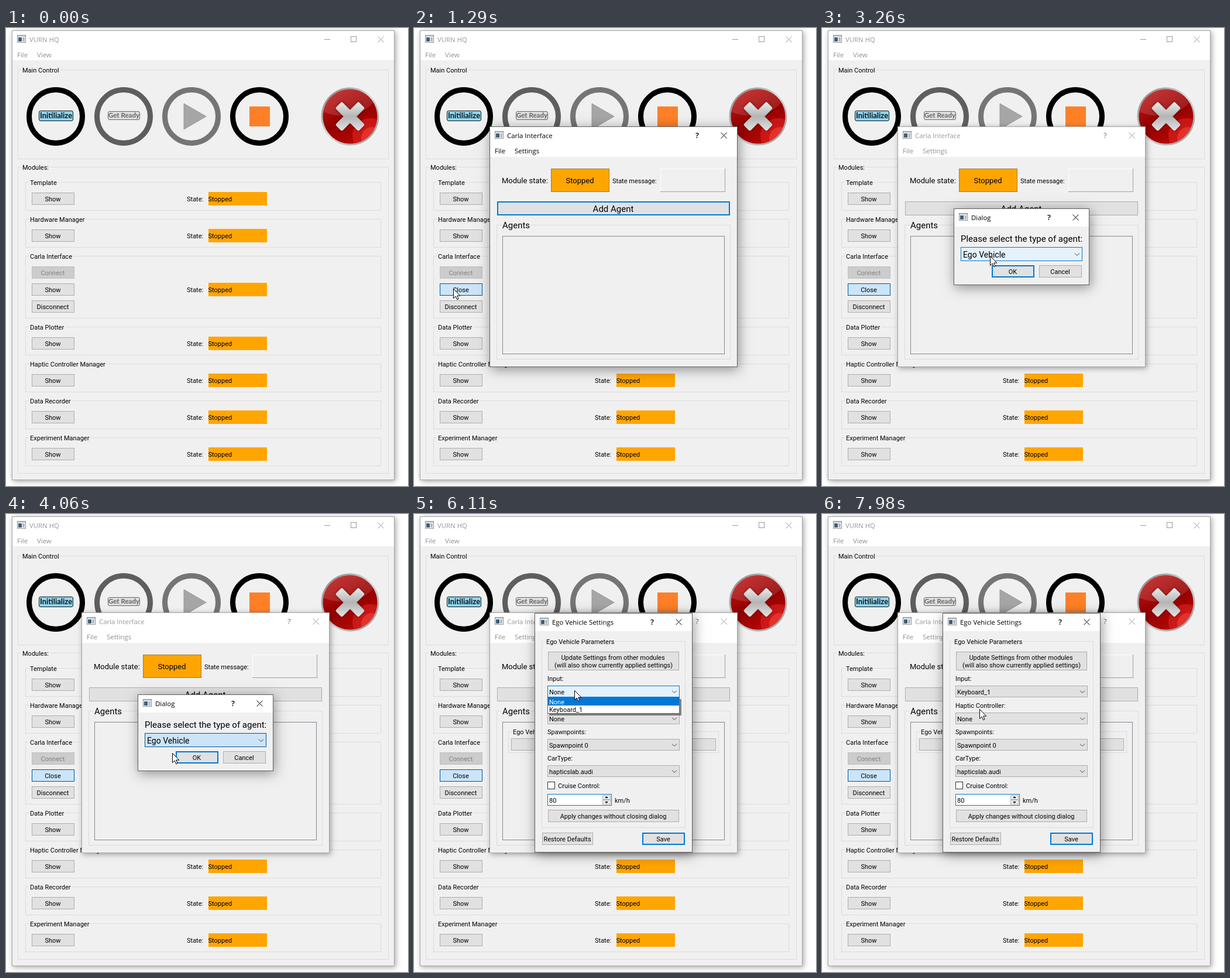
These frames come from a looping animation (687x782 px, 8000 ms). An HTML page with a canvas:

```html
<!DOCTYPE html>
<html lang="en">
<head>
<meta charset="utf-8">
<title>Module manager</title>
<style>
html, body { margin: 0; width: 100%; height: 100%; overflow: hidden; background: #fff; }
canvas { display: block; }
</style>
</head>
<body>
<canvas id="stage" width="687" height="782"></canvas>
<script>
const c = document.getElementById('stage').getContext('2d');
const LOOP = 8000, STEP = 75;
const UI = 'Roboto, sans-serif', TITLE = '"Open Sans", sans-serif', BOLD = 'Lato, sans-serif';
const BLUE = '#0078d7', FACE = '#f0f0f0', ORANGE = '#ffa500';

// Cursor path: time, x, y
const path = [
  [140, 602, 766], [290, 237, 542], [365, 237, 542], [815, 67, 445], [1455, 67, 445],
  [2060, 300, 308], [2690, 300, 308], [3120, 287, 389], [3560, 287, 389], [3760, 284, 408],
  [4070, 284, 408], [4330, 312, 415], [4560, 312, 415], [4840, 326, 408], [5100, 326, 408],
  [5720, 274, 300], [6190, 274, 301], [6560, 271, 335], [6730, 271, 334], [7820, 271, 334],
  [7960, 269, 333]
];
const clicks = [[860, 960], [2240, 2390], [3400, 3490], [3840, 3930], [4420, 4520], [5890, 6040], [6880, 7110]];

const clamp = v => Math.max(0, Math.min(1, v));
const progress = (t, from, to) => clamp((t - from) / (to - from));
const smooth = p => p * p * (3 - 2 * p);
const inside = (p, x, y, w, h) => p.x >= x && p.x < x + w && p.y >= y && p.y < y + h;

function cursorAt(t) {
  const time = 140 + Math.floor((t - 140) / STEP) * STEP;
  if (time < 140) return { x: -100, y: -100 };
  const i = path.findIndex(k => k[0] > time);
  if (i < 0) { const [, x, y] = path[path.length - 1]; return { x, y }; }
  const [t0, x0, y0] = path[i - 1], [t1, x1, y1] = path[i];
  const p = smooth(progress(time, t0, t1));
  return { x: Math.round(x0 + (x1 - x0) * p), y: Math.round(y0 + (y1 - y0) * p) };
}

function box(x, y, w, h, fill, border, line = 1) {
  if (border) {
    c.fillStyle = border;
    c.fillRect(x, y, w, h);
    x += line; y += line; w -= 2 * line; h -= 2 * line;
  }
  c.fillStyle = fill;
  c.fillRect(x, y, w, h);
}

function text(s, x, y, { size = 11, color = '#000', align = 'left', font = UI, weight = '' } = {}) {
  c.font = `${weight} ${size}px ${font}`;
  c.fillStyle = color;
  c.textAlign = align;
  c.fillText(s, x, y);
}

function polyline(points, color, width = 1) {
  c.beginPath();
  points.forEach(([x, y]) => c.lineTo(x, y));
  c.strokeStyle = color;
  c.lineWidth = width;
  c.stroke();
}

const looks = {
  normal: ['#e1e1e1', '#adadad'], hover: ['#e5f1fb', BLUE], pressed: ['#cce4f7', '#005499'],
  focus: ['#e1e1e1', BLUE, 2], focusHover: ['#e5f1fb', BLUE, 2], disabled: ['#cccccc', '#bfbfbf']
};

function button(label, x, y, w, h, look = 'normal', size = 11) {
  box(x, y, w, h, ...looks[look]);
  text(label, x + w / 2 - .5, y + h / 2 + size * .4,
    { size, align: 'center', color: look === 'disabled' ? '#838383' : '#000' });
}

function combo(label, x, y, w, h, look = 'normal', size = 11) {
  box(x, y, w, h, ...looks[look]);
  text(label, x + (size > 11 ? 4 : 3), y + h / 2 + size * .4 + .5, { size });
  const ax = x + w - 9, ay = y + h / 2 - 1.5;
  polyline([[ax - 4, ay], [ax, ay + 4], [ax + 4, ay]], '#404040');
}

function group(label, x, y, w, h, size = 11) {
  c.strokeStyle = '#dcdcdc';
  c.lineWidth = 1;
  c.strokeRect(x + .5, y + .5, w - 1, h - 1);
  const tx = x + (size > 11 ? 10 : 8);
  c.font = `${size}px ${UI}`;
  box(tx - 2, y, c.measureText(label).width + 4, 1, FACE);
  text(label, tx, y + (size > 11 ? 6 : 5), { size });
}

function popup(x, y, w, rowHeight, items, selected, size = 11) {
  const h = items.length * rowHeight + 2;
  box(x + 3, y + 3, w, h, 'rgba(0,0,0,.45)');
  box(x, y, w, h, '#fff', '#646464');
  items.forEach((item, i) => {
    const top = y + 1 + i * rowHeight;
    if (i === selected) box(x + 1, top, w - 2, rowHeight, BLUE);
    text(item, x + 3, top + rowHeight / 2 + size * .37, { size, color: i === selected ? '#fff' : '#000' });
  });
}

function appIcon(x, y) {
  box(x, y, 15, 13, '#fff', '#8b8b8b');
  box(x + 1, y + 1, 13, 2, '#c8ccd0');
  c.fillStyle = '#3b6078';
  c.fillRect(x + 2, y + 4, 6, 7);
  c.fillStyle = '#b9bdc2';
  c.fillRect(x + 9, y + 4, 4, 7);
}

function crossMark(x, y, color) {
  polyline([[x - 5, y - 5], [x + 5, y + 5]], color);
  polyline([[x + 5, y - 5], [x - 5, y + 5]], color);
}

function windowFrame(title, x, y, w, h, whiteHeight, active, help = true) {
  const ink = active ? '#000' : '#999';
  c.save();
  c.shadowColor = active ? 'rgba(0,0,0,.42)' : 'rgba(0,0,0,.36)';
  c.shadowBlur = active ? 20 : 9;
  c.shadowOffsetX = 2;
  c.shadowOffsetY = active ? 4 : 2;
  box(x, y, w, h, active ? '#606060' : '#a6a6a6');
  c.restore();
  box(x + 1, y + 1, w - 2, h - 2, FACE);
  box(x + 1, y + 1, w - 2, whiteHeight, '#fff');
  appIcon(x + 9, y + 8);
  text(title, x + 30, y + 19.5, { size: 11.4, color: ink, font: TITLE });
  crossMark(x + w - 23.5, y + 15.5, ink);
  if (help) text('?', x + w - 69, y + 19.5, { size: 13, color: ink, font: TITLE, align: 'center', weight: 600 });
}

function menu(items, y, active) {
  items.forEach(([label, x]) => text(label, x, y, { size: 11.4, font: TITLE, color: active ? '#000' : '#89928e' }));
}

// Fades and grows a window from its centre.
function opening(p, x, y, draw) {
  if (p <= 0) return;
  const s = .92 + .08 * smooth(p);
  c.save();
  c.globalAlpha = p;
  c.translate(x, y);
  c.scale(s, s);
  c.translate(-x, -y);
  draw();
  c.restore();
}

function ring(x, color) {
  c.beginPath();
  c.arc(x, 151, 45.5, 0, 7);
  c.strokeStyle = color;
  c.lineWidth = 9;
  c.stroke();
}

function badge(label, x, y, w, h, fill, ink, size) {
  c.beginPath();
  c.roundRect(x + .5, y + .5, w - 1, h - 1, 2.5);
  c.fillStyle = fill;
  c.fill();
  c.strokeStyle = ink;
  c.lineWidth = 1;
  c.stroke();
  text(label, x + w / 2, y + h / 2 + size * .34, { size, color: ink, align: 'center', font: BOLD, weight: 'bold' });
}

function disc(x, y, r, fill) {
  c.beginPath();
  c.arc(x, y, r, 0, 7);
  c.fillStyle = fill;
  c.fill();
}

function gradient(x0, y0, x1, y1, ...colors) {
  const g = c.createLinearGradient(x0, y0, x1, y1);
  colors.forEach((color, i) => g.addColorStop(i / (colors.length - 1), color));
  return g;
}

function quitButton() {
  disc(588, 151, 49.5, gradient(550, 110, 626, 192, '#8d8d8d', '#dcdcdc', '#9a9a9a'));
  disc(588, 151, 46.5, gradient(560, 105, 612, 196, '#c01818', '#940000', '#b80808'));
  c.save();
  c.beginPath();
  c.arc(588, 151, 46.5, 0, 7);
  c.clip();
  disc(622, 184, 30, 'rgba(235,40,40,.5)');
  disc(626, 188, 19, 'rgba(255,80,70,.45)');
  c.beginPath();
  c.ellipse(580, 113, 56, 36, -.15, 0, 7);
  c.fillStyle = 'rgba(255,255,255,.12)';
  c.fill();
  c.translate(588, 151);
  c.rotate(Math.PI / 4);
  c.shadowColor = 'rgba(60,0,0,.6)';
  c.shadowBlur = 4;
  c.beginPath();
  c.roundRect(-28, -8, 56, 16, 3);
  c.roundRect(-8, -28, 16, 56, 3);
  c.fillStyle = gradient(-24, -24, 24, 24, '#ffffff', '#b4b4b4', '#f4f4f4');
  c.fill();
  c.restore();
}

function mainControls() {
  group('Main Control', 20, 71, 634, 153);
  [[85, '#000'], [201, '#5e5e5e'], [317, '#757575'], [433, '#000']].forEach(([x, color]) => ring(x, color));
  badge('Initilialize', 56, 141, 59, 18, '#8fd3ea', '#07161c', 13);
  badge('Get Ready', 174, 142, 55, 15, '#dedede', '#666', 11.5);
  c.beginPath();
  c.moveTo(304, 129);
  c.lineTo(342, 151);
  c.lineTo(304, 173);
  c.closePath();
  c.fillStyle = '#a6a6a6';
  c.fill();
  c.strokeStyle = '#969696';
  c.lineWidth = 1;
  c.stroke();
  box(416, 134, 35, 34, '#ff7f27');
  quitButton();
}

function moduleRow(label, y, h, rowY, showLabel = 'Show', look) {
  group(label, 33, y, 608, h);
  button(showLabel, 44, rowY, 73, 21, look);
  text('State:', 309, rowY + 15);
  box(346, rowY - 1, 100, 23, ORANGE);
  text('Stopped', 345.5, rowY + 15);
}

function mainWindow(t, cursor) {
  const active = t >= 860 && t < 1060;
  const ink = active ? '#000' : '#999';
  windowFrame('VURN HQ', 10, 4, 654, 768, 50, active, false);
  box(544, 19, 10, 1, ink);
  c.strokeStyle = ink;
  c.lineWidth = 1;
  c.strokeRect(589.5, 14.5, 9, 9);
  menu([['File', 19], ['View', 53]], 50, active);
  mainControls();
  group('Modules:', 20, 237, 634, 524);
  const others = ['Data Plotter', 'Haptic Controller Manager', 'Data Recorder', 'Experiment Manager'];
  moduleRow('Template', 263, 49, 281);
  moduleRow('Hardware Manager', 326, 49, 344);
  const over = inside(cursor, 44, 436, 73, 21);
  moduleRow('Carla Interface', 389, 107, 436, t >= 1000 ? 'Close' : 'Show',
    t >= 880 ? 'pressed' : over ? 'hover' : 'normal');
  button('Connect', 44, 407, 73, 21, 'disabled');
  button('Disconnect', 44, 465, 73, 21);
  others.forEach((label, i) => moduleRow(label, 510 + 63 * i, 49, 528 + 63 * i));
}

function carlaWindow(t, cursor) {
  const active = t < 2390;
  windowFrame('Carla Interface', 129, 168, 424, 411, 51, active);
  menu([['File', 138], ['Settings', 172]], 214, active);
  text('Module state:', 150, 265, { size: 13 });
  box(234, 240, 100, 40, ORANGE, '#a08030');
  text('Stopped', 283.5, 265, { size: 13, align: 'center' });
  text('State message:', 339, 265);
  box(421, 240, 111, 40, '#a0a0a0');
  box(421, 240, 110, 39, FACE, '#fff');
  box(422, 241, 109, 38, FACE);
  const over = inside(cursor, 142, 296, 398, 24);
  const look = !active ? 'normal' : t >= 2250 ? 'pressed' : over ? 'focusHover' : 'focus';
  button('Add Agent', 142, 296, 398, 24, look, 15);
  group('Agents', 141, 336, 400, 230, 15);
  box(151, 355, 380, 202, FACE, '#828790');
  if (t >= 4560) {
    group('Ego Vehicle 1', 161, 371, 360, 37);
    button('Settings', 166, 383, 350, 21);
  }
}

function agentDialog(t, cursor) {
  windowFrame('Dialog', 225, 308, 232, 131, 30, true);
  text('Please select the type of agent:', 237, 364.5, { size: 15 });
  const over = inside(cursor, 237, 374, 208, 24);
  combo('Ego Vehicle', 237, 374, 208, 24, t >= 3480 && t < 4140 ? 'pressed' : over ? 'hover' : 'normal', 14);
  const overOk = t > 4140 && inside(cursor, 290, 405, 73, 21);
  button('OK', 290, 405, 73, 21, overOk ? 'focusHover' : 'focus');
  button('Cancel', 371, 405, 73, 21);
  if (t >= 3490 && t < 3950) popup(237, 398, 208, 23, ['Ego Vehicle'], 0, 14);
}

function inputCombo(t, cursor) {
  const chosen = t >= 7120;
  const label = chosen ? 'Keyboard_1' : 'None';
  const over = t < 7120 && (t >= 6040 || inside(cursor, 228, 293, 226, 20));
  combo(label, 228, 293, 226, 20, over ? 'hover' : 'normal');
  if (chosen && t < 7590) {
    c.save();
    c.globalAlpha = 1 - progress(t, 7120, 7590);
    combo(label, 228, 293, 226, 20, 'hover');
    c.restore();
  }
}

function speedBox(t) {
  box(228, 478, 110, 20, '#fff', BLUE);
  text('80', 231, 493);
  [480, 488].forEach((y, i) => {
    box(322, y, 14, 8, FACE, '#adadad');
    const base = y + (i ? 3 : 5), tip = y + (i ? 6 : 2);
    c.beginPath();
    c.moveTo(326, base);
    c.lineTo(332, base);
    c.lineTo(329, tip);
    c.fillStyle = '#000';
    c.fill();
  });
  text('km/h', 343, 493);
  if (t < 6040 && Math.floor((t - 4800) / 530) % 2 === 0) box(231, 481, 1, 14, '#000');
}

function settingsWindow(t, cursor) {
  windowFrame('Ego Vehicle Settings', 206, 169, 270, 409, 30, true);
  group('Ego Vehicle Parameters', 218, 217, 246, 319);
  button('', 229, 235, 224, 32);
  text('Update Settings from other modules', 340, 249, { align: 'center' });
  text('(will also show currently applied settings)', 341, 262, { align: 'center' });
  text('Input:', 228, 285);
  inputCombo(t, cursor);
  [['Haptic Controller:', 'None', 339], ['Spawnpoints:', 'Spawnpoint 0', 384], ['CarType:', 'hapticslab.audi', 429]]
    .forEach(([label, value, y]) => {
      text(label, 228, y - 8);
      combo(value, 228, y, 226, 20);
    });
  box(228, 457, 13, 13, '#fff', '#333');
  text('Cruise Control:', 246, 468);
  speedBox(t);
  button('Apply changes without closing dialog', 229, 505, 224, 21);
  button('Restore Defaults', 219, 544, 87, 21);
  button('Save', 390, 544, 73, 21, 'focus');
  if (t >= 6040 && t < 7120) {
    popup(228, 313, 226, 13, ['None', 'Keyboard_1'], cursor.y >= 327 ? 1 : 0);
  }
}

function drawCursor({ x, y }, pressed) {
  if (pressed) disc(x, y, 12, 'rgba(140,185,255,.45)');
  c.save();
  c.translate(x + .5, y + .5);
  c.beginPath();
  [[0, 0], [0, 16], [3.7, 12.6], [6.2, 18.2], [8.6, 17.2], [6.2, 11.6], [11.3, 11.6]]
    .forEach(([px, py]) => c.lineTo(px, py));
  c.closePath();
  c.fillStyle = '#fff';
  c.fill();
  c.strokeStyle = '#000';
  c.lineWidth = 1;
  c.stroke();
  c.restore();
}

function render(t) {
  const cursor = cursorAt(t);
  box(0, 0, 687, 782, '#fff');
  mainWindow(t, cursor);
  opening(progress(t, 1060, 1270), 341, 373, () => carlaWindow(t, cursor));
  if (t < 4540) opening(progress(t, 2460, 2680), 341, 373, () => agentDialog(t, cursor));
  opening(progress(t, 4600, 4820), 341, 373, () => settingsWindow(t, cursor));
  drawCursor(cursor, clicks.some(([from, to]) => t >= from && t < to));
}

const start = performance.now();
function frame() {
  render((performance.now() - start) % LOOP);
  requestAnimationFrame(frame);
}
frame();
</script>
</body>
</html>
```
